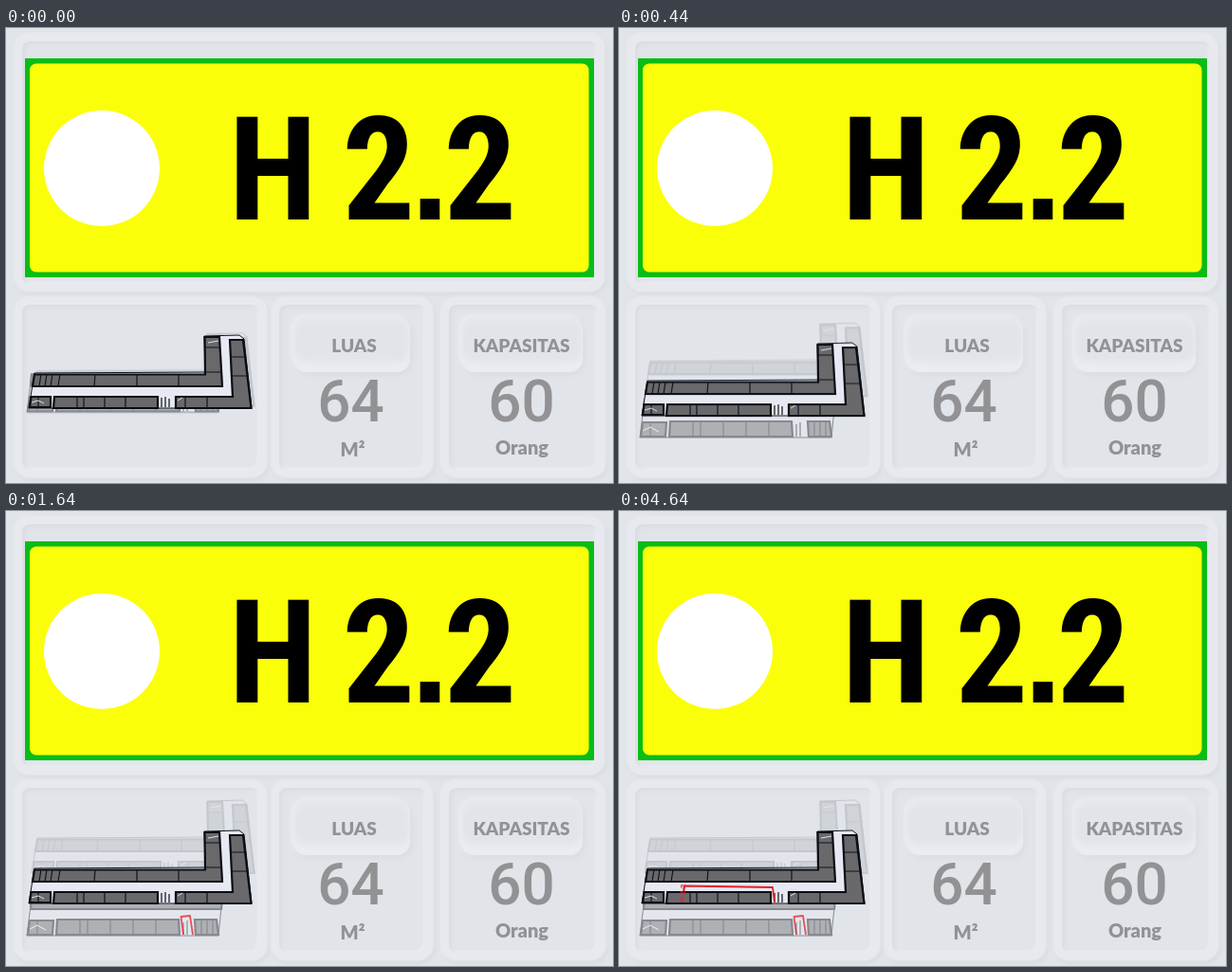
An HTML page for the animation above (5120 ms loop, 640x480 px).

```html
<!DOCTYPE html>
<html lang="id">
<head>
<meta charset="utf-8">
<title>H 2.2</title>
<style>
  html, body { margin: 0; width: 100%; height: 100%; overflow: hidden; background: #e1e4e9; }
  .card {
    position: absolute; box-sizing: border-box; border: 8px solid #e7e9ee; border-radius: 16px;
    background: #e1e4e9;
    box-shadow: 0 0 3px #f0f2f5, 2px 3px 5px #d6d9df, inset 2px 2px 4px #d8dbe1, inset -2px -2px 3px #eceef2;
  }
  .pill {
    position: absolute; top: 305px; height: 58px; border-radius: 14px; background: #e1e4e9;
    box-shadow: -2px -2px 4px #eceef2, 2px 3px 5px #d9dce1, inset 0 -11px 6px #eaecf0, inset 0 6px 5px #e6e8ed;
  }
  svg { position: absolute; left: 0; top: 0; }
  text { text-anchor: middle; }
  .sign { font: 600 152px "Roboto Condensed", Roboto, sans-serif; font-stretch: 75%; }
  .dot { font: 700 146px "Liberation Sans", sans-serif; }
  .info { fill: #929294; }
  .label { font: 900 19px Lato, sans-serif; }
  .unit { font: 900 20px Lato, sans-serif; }
  .num { font: 500 62px Roboto, sans-serif; }
  .tag { font: 700 8px Roboto, sans-serif; fill: #e3202b; }

  .slab { fill: #e6e9f1; stroke: #0d1420; stroke-width: 1; }
  .room { fill: #69696b; stroke: #0a0d15; stroke-width: 2.2; }
  .wall { fill: none; stroke: #10131c; stroke-width: 1.2; }
  .route { fill: none; stroke: #e3202b; stroke-width: 1.8; stroke-linejoin: round; }

  /* --from: offset of a floor while the building is closed */
  .floor { animation: spread 5120ms linear infinite; }
  @keyframes spread {
    0% { transform: translateY(calc(var(--from) * .93)); }
    5.47% { transform: translateY(calc(var(--from) * .53)); }
    11.72% { transform: translateY(calc(var(--from) * .17)); }
    14.84%, 100% { transform: none; }
  }
  .route { stroke-dasharray: 100 200; }
  .ground { animation: ground 5120ms linear infinite; }
  @keyframes ground {
    0%, 11.8% { stroke-dashoffset: 101; }
    14.84%, 100% { stroke-dashoffset: 0; }
  }
  .upper { animation: upper 5120ms linear infinite; }
  @keyframes upper {
    0%, 32% { stroke-dashoffset: 101; }
    42.2%, 43% { stroke-dashoffset: 15; }
    50%, 100% { stroke-dashoffset: 0; }
  }
  .tag { animation: tag 5120ms linear infinite; }
  @keyframes tag {
    0%, 57.8% { opacity: 0; }
    61.7%, 100% { opacity: 1; }
  }
</style>
</head>
<body>
<div class="card" style="left:9px;top:6px;width:622px;height:272px"></div>
<div class="card" style="left:9px;top:284px;width:266px;height:190px"></div>
<div class="card" style="left:280px;top:284px;width:170px;height:190px"></div>
<div class="card" style="left:459px;top:284px;width:173px;height:190px"></div>
<div class="pill" style="left:303px;width:123px"></div>
<div class="pill" style="left:480px;width:128px"></div>

<svg width="640" height="480" viewBox="0 0 640 480">
  <defs>
    <g id="plan">
      <path class="slab" d="M30 377L210 376 209 338 246 337 251 341 259 414H24Z"/>
      <path class="room" d="M30 378.500H210L209.500 339H225L228 391H28Z
        M236 342H250L258.500 414H179V402H239Z M51 402H160V414H50Z M26.500 402H47V413H25Z"/>
      <path class="wall" d="M37 378L35 391M43 378L41 391M49 378L47 391M57 378L55 391M94 378L93 391
        M138 378V391M182 378V391M210 376H227M210 350H226M237 360H252M238 380H254
        M75 402V414M82 402V414M104 402V414M126 402V414M189 402V414M212 402V414M34 402V413
        M164 403V413M168 402V413M172 404V413"/>
      <path d="M213 345L224 343M27 408L34 406 40 409M181 406L186 403" stroke="#dfe3ec" fill="none"/>
    </g>
  </defs>

  <rect x="20" y="32" width="600" height="231" fill="#08bd16"/>
  <rect x="25" y="37.500" width="589.500" height="220" rx="7" fill="#fbfe09"/>
  <circle cx="101" cy="148" r="61" fill="#fff"/>
  <text class="sign" x="281.500 339 393 447 500" y="202">H 2<tspan class="dot">.</tspan>2</text>

  <g class="info">
    <text class="label" x="367" y="342">LUAS</text>
    <text class="label" x="543.500" y="342">KAPASITAS</text>
    <text class="num" x="363.500" y="415">64</text>
    <text class="num" x="543.500" y="415">60</text>
    <text class="unit" x="365.500" y="452">M²</text>
    <text class="unit" x="544" y="450">Orang</text>
  </g>

  <g class="floor" style="--from:18px">
    <use href="#plan" x="3" y="-32" opacity=".13"/>
  </g>

  <g class="floor" style="--from:-46px">
    <g opacity=".42">
      <path class="slab" d="M27 408H228L224 448H22Z"/>
      <path class="room" stroke-width="1" d="M27 408H228L227 420H26Z
        M54 431H182L183 447H53Z M25 432H50L49 447H23Z M199 431H222L224 447H200Z"/>
      <path class="wall" d="M33 432V447M78 431V447M86 431V447M110 431V447M134 431V447M158 431V447
        M206 431V447M212 431V447M218 431V447M187 434V447M191 432V447"/>
      <path d="M25 441L33 437 42 442" stroke="#fff" fill="none"/>
    </g>
    <path class="route ground" pathLength="100" opacity=".75" d="M187 447L184.500 428 194 427 197 447"/>
  </g>

  <g class="floor" style="--from:-14px">
    <use href="#plan"/>
    <path class="route upper" pathLength="100" d="M164 413L162 397 69 395.500 68 401"/>
    <text class="tag" transform="translate(69.500 403.500) rotate(-86)">H 2.2</text>
  </g>
</svg>
</body>
</html>
```
